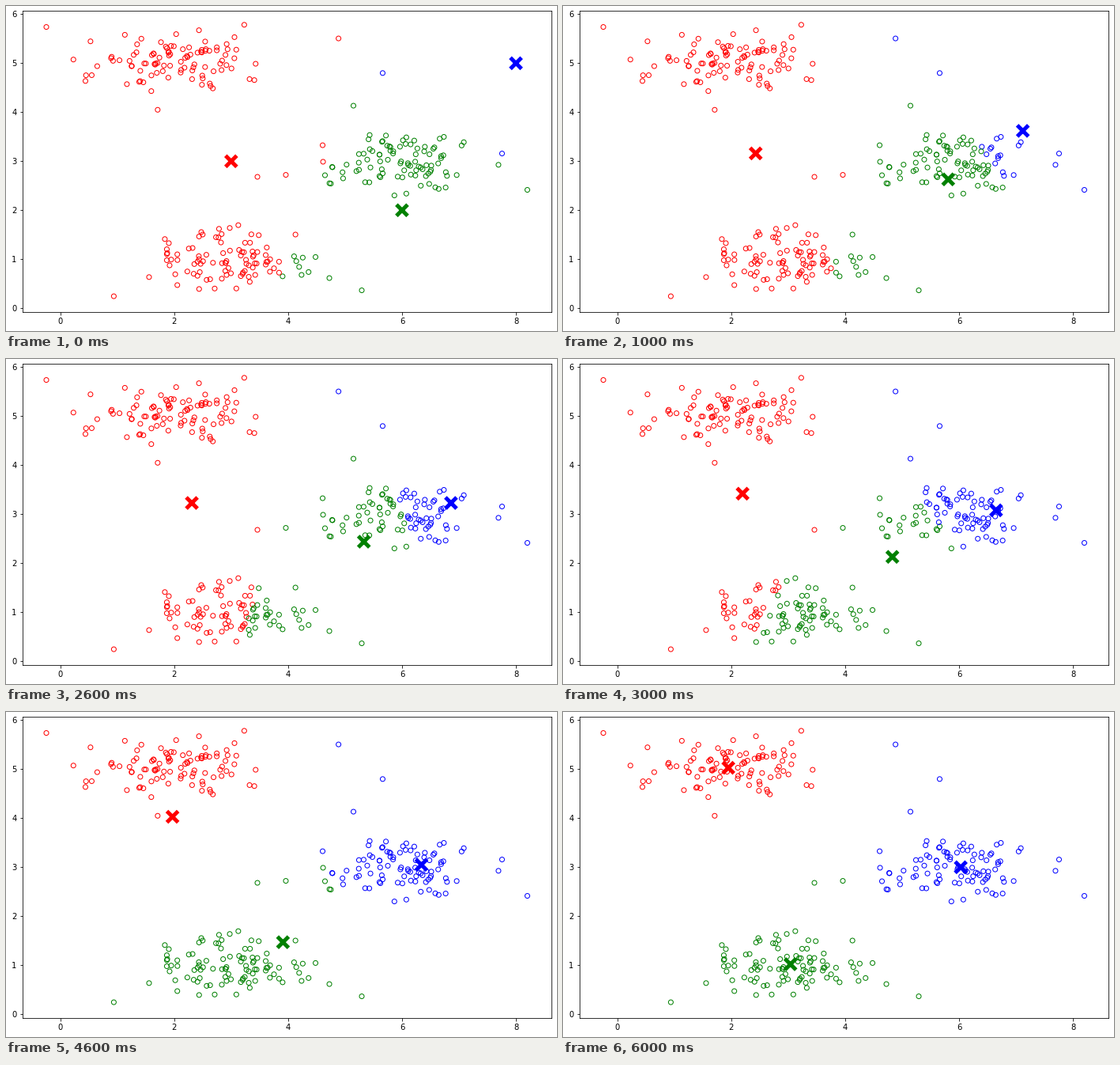
A matplotlib script for the animation above (7 s loop, 697 px wide and 411 px high).

```python
import numpy as np
import matplotlib.pyplot as plt
from matplotlib.animation import FuncAnimation

W, H, DPI = 697, 411, 72
COLORS = np.array(["red", "green", "blue"])

# Key positions of the red, green and blue centroid, one row per step
STEPS = np.array([
    [(3, 3), (6, 2), (8, 5)],
    [(2.43, 3.16), (5.81, 2.63), (7.12, 3.62)],
    [(2.31, 3.23), (5.33, 2.44), (6.86, 3.23)],
    [(2.20, 3.42), (4.83, 2.13), (6.65, 3.08)],
    [(1.97, 4.03), (3.91, 1.47), (6.34, 3.05)],
    [(1.95, 5.03), (3.12, 1.11), (6.13, 3.01)],
    [(1.95, 5.03), (3.04, 1.02), (6.03, 3.00)],
])

# Lone points far from any cluster
OUTLIERS = [
    (-.245, 5.74), (1.71, 4.05), (3.23, 5.785), (4.885, 5.506), (5.66, 4.8),
    (5.147, 4.134), (4.606, 3.327), (3.461, 2.682), (3.96, 2.722),
    (7.756, 3.158), (8.2, 2.416), (.94, .245), (4.724, .616), (5.293, .366),
]


def cluster(rng, count, mean, std, reach=2.2):
    """Normal samples kept within an ellipse around the mean."""
    z = rng.normal(size=(count * 2, 2))
    z = z[np.hypot(*z.T) < reach][:count]
    return mean + z * std


rng = np.random.default_rng(12)
points = np.vstack([
    OUTLIERS,
    cluster(rng, 97, (1.95, 5.03), (.9, .31)),
    cluster(rng, 97, (2.95, 1.01), (.85, .33)),
    cluster(rng, 92, (6.0, 2.96), (.85, .3)),
])

fig = plt.figure(figsize=(W / DPI, H / DPI), dpi=DPI, facecolor="white")
ax = fig.add_axes([20.56 / W, 24 / H, 669.6 / W, 380.52 / H])
ax.set_xlim(-.6676, 8.6258)
ax.set_ylim(-.077, 6.0637)
ax.set_xticks(range(0, 9, 2))
ax.set_yticks(range(7))

dots = ax.scatter(*points.T, s=36, facecolors="none", edgecolors="red",
                  linewidths=1)
marks = ax.scatter(*STEPS[0].T, s=200, marker="x", c=COLORS, linewidths=5,
                   zorder=2)


def update(i):
    """Move the centroids and colour each point by its nearest one."""
    dist = np.linalg.norm(points[:, None] - STEPS[i], axis=2)
    dots.set_edgecolors(COLORS[dist.argmin(axis=1)])
    marks.set_offsets(STEPS[i])
    return dots, marks


anim = FuncAnimation(fig, update, frames=len(STEPS), interval=1000,
                     repeat=True, repeat_delay=0)
plt.show()
```
